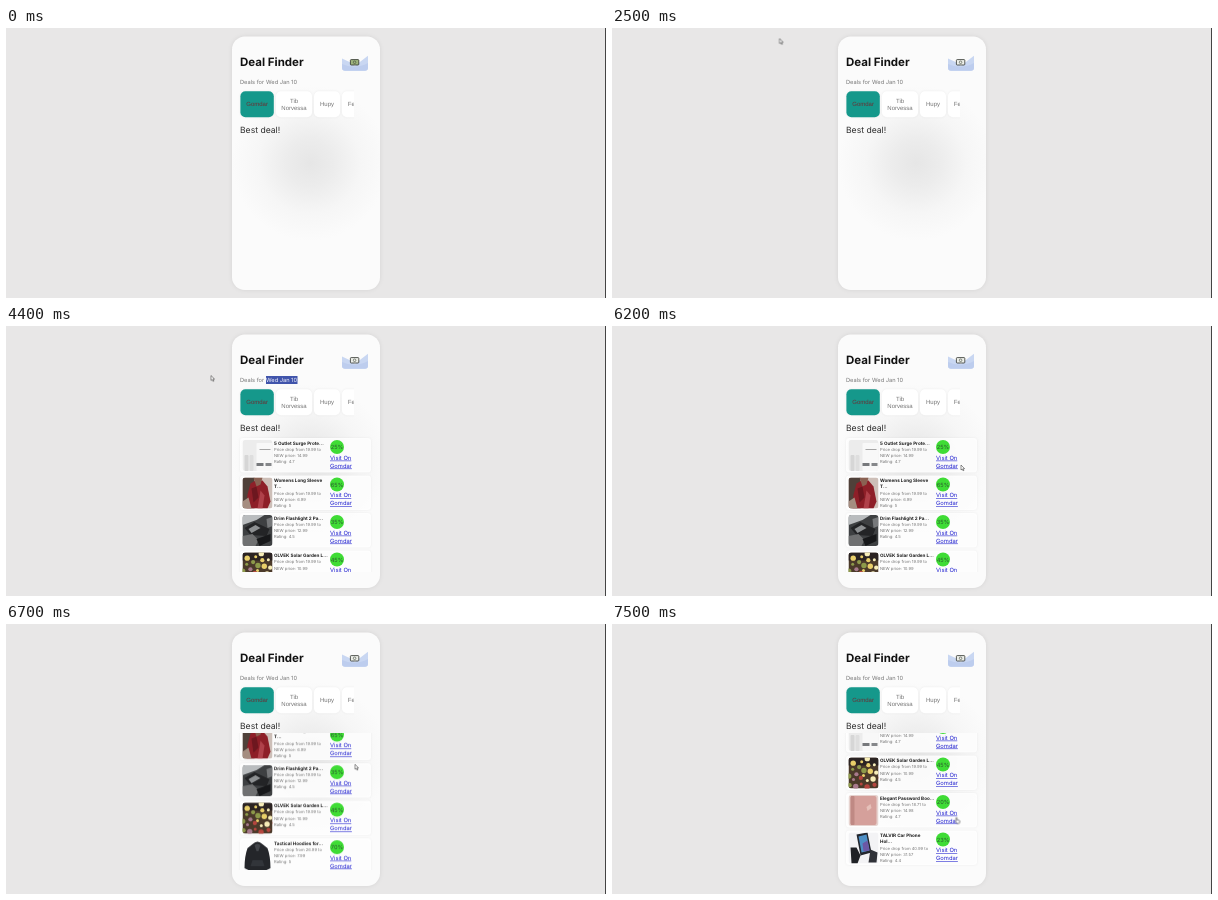
Recreate the animation shown at these times as an HTML page. Size 600 by 270 pixels, loop 8 s.

```html
<!DOCTYPE html>
<html lang="en">
<head>
<meta charset="utf-8">
<title>Deal Finder</title>
<style>
  html, body { margin: 0; width: 100%; height: 100%; overflow: hidden; background: #e8e7e7; }
  svg { display: block; width: 100%; height: 100%; }
  text { font-family: Inter, "Open Sans", sans-serif; text-rendering: geometricPrecision; }
  .card { fill: url(#glow); filter: drop-shadow(0 .8px 2px rgba(0, 0, 0, .08)); }
  .heading { font-size: 11.5px; font-weight: 700; fill: #111; }
  .sub { font-size: 5.7px; fill: #777; }
  .best { font-size: 8.6px; fill: #2e2e2e; }
  .tab { fill: #fff; filter: drop-shadow(0 .3px .8px rgba(0, 0, 0, .06)); }
  .tab.on { fill: #15988b; }
  .label { font: 6px "Liberation Sans", Arial, sans-serif; fill: #757575; text-anchor: middle; }
  .label.on { fill: #6b3034; }
  .row { fill: #fff; fill-opacity: .85; filter: drop-shadow(0 .5px 1px rgba(0, 0, 0, .07)); }
  .name { font-size: 4.6px; font-weight: 700; fill: #1b1b1b; }
  .info { font-size: 4.15px; fill: #777; }
  .off { font-size: 5.7px; fill: #2b5a30; text-anchor: middle; }
  .link { font-size: 5.8px; fill: #2020cf; text-decoration: underline; }

  .bill, .list, .scroll, .mark, .date, .cursor, .arrow, .hand { animation: 8s linear infinite; }
  .bill { animation-name: bill; animation-timing-function: step-end; }
  .list { animation-name: reveal; animation-timing-function: step-end; }
  .scroll { animation-name: scroll; }
  .mark { animation-name: mark; transform-origin: 291.5px 54px; }
  .date { animation-name: date; animation-timing-function: step-end; }
  .cursor { animation-name: move; }
  .arrow { animation-name: arrow; animation-timing-function: step-end; }
  .hand { animation-name: hand; animation-timing-function: step-end; }

  @keyframes bill { 0% { fill: #9fb57d; } 1.25%, 100% { fill: #eef0ea; } }
  @keyframes reveal { 0% { opacity: 0; } 54.95%, 100% { opacity: 1; } }
  @keyframes scroll {
    0%, 78.9% { transform: translateY(0); }
    81.2% { transform: translateY(-35px); }
    84% { transform: translateY(-49px); }
    87.45% { transform: translateY(-64.5px); }
    90% { transform: translateY(-106px); }
    93.7%, 100% { transform: translateY(-243px); }
  }
  @keyframes mark {
    0%, 43.75% { transform: scaleX(0); }
    48.5%, 57.45% { transform: scaleX(1); }
    57.5%, 100% { transform: scaleX(0); }
  }
  @keyframes date { 0% { fill: #777; } 47% { fill: #f4f5ff; } 57.5%, 100% { fill: #777; } }
  @keyframes move {
    0%, 5% { transform: translate(252px, 70px); animation-timing-function: ease-in-out; }
    12% { transform: translate(158px, 5px); animation-timing-function: ease-out; }
    15%, 31.25% { transform: translate(167.5px, 10.5px); animation-timing-function: ease-in-out; }
    41.25%, 43.75% { transform: translate(290px, 52px); }
    51.25%, 54.9% { transform: translate(240px, 52px); }
    54.95%, 68.7% { transform: translate(205px, 49.5px); animation-timing-function: ease-in-out; }
    77.45%, 82% { transform: translate(349px, 139px); }
    87.45%, 91.2% { transform: translate(349px, 143px); }
    93.7%, 100% { transform: translate(343.5px, 193.5px); }
  }
  @keyframes arrow { 0% { opacity: 0; } 5% { opacity: 1; } 92.5%, 100% { opacity: 0; } }
  @keyframes hand { 0% { opacity: 0; } 92.5%, 100% { opacity: 1; } }
</style>
</head>
<body>
<svg viewBox="0 0 600 270" preserveAspectRatio="none">
  <defs>
    <radialGradient id="glow" gradientUnits="userSpaceOnUse" cx="304" cy="135" r="78">
      <stop offset="0" stop-color="#e6e6e6"/>
      <stop offset=".3" stop-color="#ececec"/>
      <stop offset=".65" stop-color="#f6f6f6"/>
      <stop offset="1" stop-color="#fbfbfb"/>
    </radialGradient>
    <clipPath id="view"><rect x="232" y="109" width="136" height="136.5"/></clipPath>
    <clipPath id="tabView"><rect x="232" y="60" width="116" height="33"/></clipPath>
    <clipPath id="thumb"><rect width="30" height="31" rx="3"/></clipPath>
  </defs>

  <path d="M599.5 0V270" stroke="#444"/>
  <rect class="card" x="226" y="8.5" width="148" height="253.5" rx="13"/>

  <text class="heading" x="234" y="38.2">Deal Finder</text>
  <g transform="translate(336 27)">
    <path d="M0 3.5Q7 6 13 11 19 6 26 .8V12.500Q26 15.700 22.800 15.700H3.200Q0 15.700 0 12.500Z" fill="#c9d7f2"/>
    <path d="M0 9Q13 15 26 8V12.500Q26 15.700 22.800 15.700H3.200Q0 15.700 0 12.500Z" fill="#bdcdee"/>
    <rect class="bill" x="8.400" y="4.600" width="8.400" height="5.400" rx=".8" stroke="#2d302b" stroke-width=".8"/>
    <circle cx="12.600" cy="7.300" r="1.300" fill="none" stroke="#3c4438" stroke-width=".6"/>
  </g>

  <text class="sub" x="234" y="56">Deals for</text>
  <rect class="mark" x="260" y="50" width="31.500" height="8" fill="#4054ab"/>
  <text class="sub date" x="260" y="56">Wed Jan 10</text>

  <g id="tabs" clip-path="url(#tabView)"></g>
  <text class="best" x="234" y="105.200">Best deal!</text>

  <g class="list" clip-path="url(#view)"><g class="scroll" id="rows"></g></g>

  <g class="cursor" stroke="#444" stroke-width=".6" fill="#fff">
    <path class="arrow" d="M0 0V5L1.200 4 2 5.800 2.900 5.400 2.100 3.700H3.600Z"/>
    <path class="hand" d="M1 0Q1.700 0 1.700.8V2.500L4 3Q4.500 3.200 4.400 4L3.800 6H1.500L0 4Q-.2 3.400.4 3.300V.8Q.4 0 1 0Z"/>
  </g>
</svg>

<script>
  const SHOP = "Gomdar";
  const box = (x, y, w, h, fill, rx = 0) =>
    `<rect x="${x}" y="${y}" width="${w}" height="${h}" fill="${fill}" rx="${rx}"/>`;
  const shape = (d, fill) => `<path d="${d}" fill="${fill}"/>`;
  const dot = (x, y, r, fill) => `<circle cx="${x}" cy="${y}" r="${r}" fill="${fill}"/>`;
  const text = (cls, x, y, str) => `<text class="${cls}" x="${x}" y="${y}">${str}</text>`;

  // Coloured garden lights spread by the golden angle.
  const lights = () => {
    const tones = ["#e9cf6a", "#b5463f", "#8d9a4a", "#f7edb8", "#a77a8c"];
    let out = "";
    for (let i = 0; i < 24; i++) {
      const a = i * 2.4, r = 3.6 * Math.sqrt(i);
      out += dot(15 + r * Math.cos(a), 18 + r * Math.sin(a), 1.5 + i % 3 * .6, tones[i % 5]);
    }
    return out;
  };

  const art = {
    outlet: box(0, 0, 30, 31, "#ececec") + box(2, 15, 4, 16, "#d6d6d6", 1) +
      box(7, 15, 4, 16, "#dedede", 1) + box(14, 3, 16, 28, "#f8f8f8", 1) +
      box(17, 9, 11, 1, "#a5a5a5") + box(14, 23, 7, 3, "#77797c") + box(23, 23, 6, 3, "#85878a"),
    dress: box(0, 0, 30, 31, "#cdbfb8") + box(0, 0, 12, 31, "#4f4039") +
      shape("M8 6 13 3H20L25 9 28 24 25 31H4L5 17Z", "#8e1f28") +
      shape("M11 0H20L18 7 14 9Z", "#8a6152") +
      shape("M9 11 14 9 16 20 11 25Z", "#6d171f") + shape("M18 13 22 18 20 31H15Z", "#b0414a") +
      shape("M0 24 6 20 9 31H0Z", "#a58d80"),
    torch: box(0, 0, 30, 31, "#3e4042") + shape("M0 0H22L14 5 0 10Z", "#b9bcbe") +
      shape("M2 13 12 7 27 14 24 21 8 20Z", "#232426") + shape("M6 14 13 10 18 13 9 18Z", "#8d9092") +
      shape("M0 21 10 19 16 25 13 31H0Z", "#6f7071") + shape("M14 24 28 19V26L17 31Z", "#17181a") +
      shape("M24 4 30 2V11L25 13Z", "#77797b"),
    lights: box(0, 0, 30, 31, "#4b3a2a") + box(0, 0, 30, 8, "#2b2322") + lights(),
    hoodie: box(0, 0, 30, 31, "#fdfdfd") +
      shape("M10 4Q15-1 20 4L25 8Q28 16 28 28L24 30H6L2 28Q2 16 5 8Z", "#24262a") +
      shape("M12 5Q15 2 18 5L16 11H14Z", "#43464b") + shape("M10 20H20L22 26H8Z", "#32353a"),
    makeup: box(0, 0, 30, 31, "#fff") + box(9, 13, 4, 16, "#262226", 1) + box(18, 13, 3, 16, "#b9837c", 1),
    book: box(0, 0, 30, 31, "#e6d3cf") + box(2, 1, 26, 29, "#d5a09b", 2) +
      box(2, 1, 4, 29, "#bf8984", 1) + shape("M18 12 22 9 23 13 19 16Z", "#e6c1ba"),
    holder: box(0, 0, 30, 31, "#f3f3f5") + shape("M8 2 19 0 23 20 12 23Z", "#23262d") +
      shape("M10 4 18 2 21 18 13 20Z", "#4e8fc5") + shape("M14 11 19 8 21 18 15 19Z", "#6c58a5") +
      shape("M2 15H8L12 23 9 31H3Z", "#202226") + shape("M22 17 29 20 28 30H20Z", "#303238")
  };

  const outlet = ["outlet", "5 Outlet Surge Prote...", "", "19.99", "14.99", "4.7", 25];
  const garden = ["lights", "OLVEK Solar Garden L...", "", "19.99", "10.99", "4.5", 45];
  const deals = [
    outlet,
    ["dress", "Womens Long Sleeve", "T...", "19.99", "6.99", "5", 65],
    ["torch", "Drim Flashlight 2 Pa...", "", "19.99", "12.99", "4.5", 35],
    garden,
    ["hoodie", "Tactical Hoodies for...", "", "26.99", "7.99", "5", 70],
    ["makeup", "Makeup Voluminous", "...", "14.99", "8.99", "4.4", 40],
    outlet,
    garden,
    ["book", "Elegant Password Boo...", "", "18.71", "14.98", "4.7", 20],
    ["holder", "TALVIR Car Phone", "Hol...", "40.99", "31.57", "4.4", 23]
  ];

  const row = ([pic, name, more, was, now, stars, off], i) => {
    const y = more ? 19 : 12.9;
    return `<g transform="translate(234 ${112 + i * 37.5})">
      <rect class="row" width="131" height="34.5" rx="3"/>
      <g transform="translate(2.5 2)" clip-path="url(#thumb)">${art[pic]}</g>` +
      text("name", 34, 6.7, name) + text("name", 34, 12.8, more) +
      text("info", 34, y, `Price drop from ${was} to`) +
      text("info", 34, y + 6.1, `NEW price: ${now}`) +
      text("info", 34, y + 12.2, `Rating: ${stars}`) +
      dot(97, 9, 7, "#3fdc35") + text("off", 97, 11, off + "%") +
      text("link", 90, 21.6, "Visit On") + text("link", 90, 29.5, SHOP) + "</g>";
  };

  const tab = ([x, w, ...lines], i) => {
    const on = i ? "" : " on";
    const top = 78.2 - (lines.length - 1) * 3.5;
    return `<rect class="tab${on}" x="${x}" y="63.3" width="${w}" height="26" rx="5"/>` +
      lines.map((s, n) => text("label" + on, x + w / 2, top + n * 7, s)).join("");
  };

  const tabs = [[234.4, 33.4, SHOP], [270, 36, "Tib", "Norvessa"], [308, 26, "Hupy"], [336, 25, "Fenk"]];
  document.getElementById("tabs").innerHTML = tabs.map(tab).join("");
  document.getElementById("rows").innerHTML = deals.map(row).join("");
</script>
</body>
</html>
```
